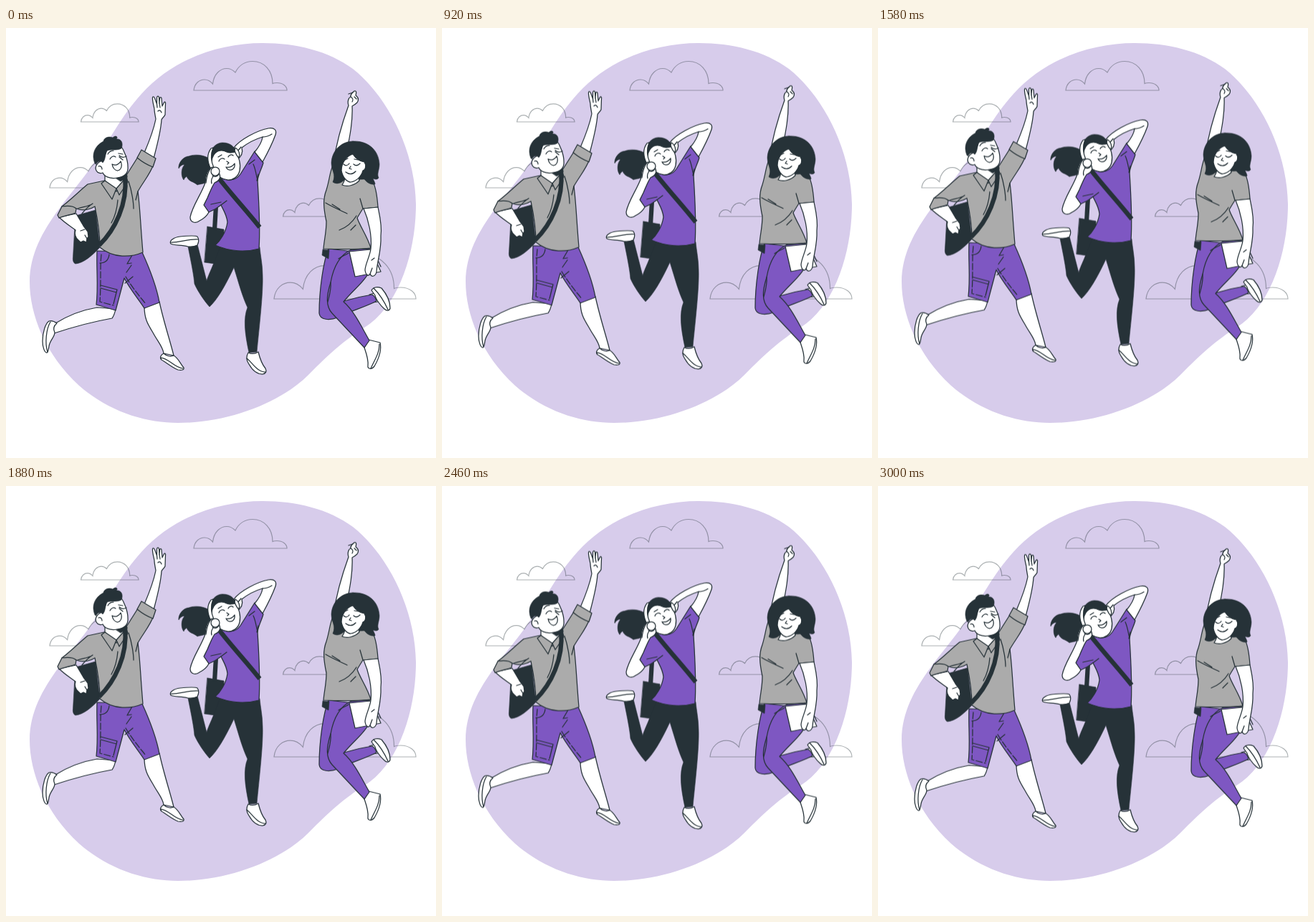
These frames come from a looping animation (600 px wide and 600 px high, 3040 ms). An HTML page:

```html
<!DOCTYPE html>
<html lang="en">
<head>
<meta charset="utf-8">
<title>Jumping friends</title>
<style>
html, body { margin: 0; width: 100%; height: 100%; overflow: hidden; background: #fff; }
svg { display: block; width: 100%; height: 100%; }
#people path, #people circle { stroke: #263238; stroke-width: 1.25; stroke-linejoin: round; stroke-linecap: round; }
#people .w { fill: #fff; }
#people .d { fill: #263238; stroke-width: .6; }
#people .p { fill: #7e57c2; }
#people .g { fill: #ababab; }
#people .l { fill: none; }
#people .strap { fill: none; stroke-width: 6.2; stroke-linecap: butt; }
#people .stitch { fill: none; stroke-dasharray: 9 3; }
#clouds { fill: none; stroke: #263238; stroke-opacity: .38; stroke-width: 1.2; }
#cloud { vector-effect: non-scaling-stroke; }
</style>
</head>
<body>
<svg viewBox="0 0 600 600">
  <defs>
    <path id="cloud" d="M0 0C1-10 8-15 15-15C20-15 24-12 26.500-9C28-23 37-30.500 46-30.500C51-30.500 55-28 58-25C63-35 72-40.500 82-40.500C98-40.500 110-28 110-9.500C112-10.500 114-10.500 116-10.500C124-10.500 130-6 130 0Z"/>
  </defs>
  <path fill="#d7cceb" d="M358 21C298 21 233 43 189 92C160 124 147 153 120 192C88 239 33 288 33 354C33 400 55 456 102 499C143 535 194 551 240 551C310 551 383 523 422 484C451 455 470 437 503 416C550 385 572 310 572 246C571 170 532 95 484 57C450 32 405 21 358 21Z"/>
  <g id="clouds"></g>

  <g id="people">
    <g id="man">
      <path class="w" d="M193 174C199 160 206 142 209 127C208 121 207 117 207 113C206 107 204 102 204.500 97C205 95 207 96 207.500 98L210.500 106L210.500 97C211 94.500 213 94.500 213.500 97L214 105L214.500 98C215 96 216.500 96 217 98L218 109L220.500 104C222 102 223 104 222.500 106L222 121C221 124 218 125 217 128C216 145 211 163 206 182Z"/>
      <path class="l" d="M210.500 106L211 111M214 105L215 111M212 116C214 114 216 115 217 118"/>
      <path class="d" d="M97 262L125 254L131 306C120 318 108 328 97 329C94 328 93 324 93.500 320Z"/>
      <path class="w" d="M74 264C82 272 92 278 97 282C95 287 97 293 101 296L104 299L108 297L112 299L113 294L115 291L114 284L108 276L98 259Z"/>
      <path class="l" d="M104 283L110 281M110 289L113 294"/>

      <path class="w" d="M127 390C103 394 82 404 69 412C65 416 65 422 67 426C85 420 120 410 148 405C151 401 152 397 153 392Z"/>
      <path class="w" d="M60 409C55 412 51 425 51 437C51 446 54 453 57 453C59 453 59 449 60 444C61 436 68 431 68 425C66 421 66 416 71 412C67 409 63 408 60 409Z"/>
      <path class="l" d="M62 410C56 420 54 440 58 452"/>
      <path class="w" d="M193 388C193 405 197 412 205 425C212 438 219 445 220 454L234 457C230 440 220 410 214 382Z"/>
      <path class="w" d="M220 454C216 456 214 460 217 463C224 467 232 474 240 477C245 478 249 477 248 474C243 468 240 460 234 457C230 459 224 458 220 454Z"/>
      <path class="l" d="M216 460C226 460 235 474 247 475"/>

      <path class="p" d="M127 311L190 313C200 335 210 360 214 383L193 391C186 380 172 363 165 349L153 394L126 386C129 360 126 340 127 311Z"/>
      <path class="l" d="M144 316C143 324 138 328 131 328M176 317L169 329L175 328M175 331L168 341M177 347L166 356M132 359L155 365L154 369L132 363M154 369L150 385"/>
      <path class="stitch" d="M133 316C131 335 133 350 131 382L150 387M167 347C178 365 188 376 195 385"/>

      <path class="g" d="M137 213L114 218C104 226 90 240 78 249L98 252C108 256 118 253 124 249C128 268 131 285 131 306C150 322 175 320 191 313C188 280 187 250 184 228C192 214 201 204 206 190L184 180L167 207L154 226Z"/>
      <path class="g" d="M78 249C85 248 94 248 98 252L97 258C92 260 82 262 74 265L72 261Z"/>
      <path class="g" d="M189 170L209 182L205 194C197 191 189 186 183 181Z"/>
      <path class="w" d="M138 202L138 213L154 228L169 207L166 198Z"/>
      <path class="d" d="M148 206C156 207 163 205 168 203L169 209L160 214Z"/>
      <path class="g" d="M138 213L133 217L148 239L154 224ZM154 224L168 208L170 215L158 233Z"/>
      <path class="strap" d="M166 207C170 245 152 282 130 303"/>
      <path class="l" d="M171 214C176 228 178 245 178 252M184 228L181 240M100 252C107 249 114 250 121 245M121 245C116 248 110 254 106 259M156 240C155 252 151 265 147 272"/>

      <path class="w" d="M136 184C128 187 123 193 126 199C128 203 133 203 135 202C137 207 145 211 155 209C166 208 171 202 170 193C170 184 165 171 160 164L143 164Z"/>
      <path class="d" d="M124 189C119 177 123 165 136 158C137 152 145 151 149 153C153 149 157 152 154 155C161 154 164 161 161 168C154 172 145 168 140 172C138 179 139 183 135 188C132 184 127 186 126 190Z"/>
      <path class="l" d="M129 193C132 192 134 194 134 197M142 176C144 172 147 171 150 171M145 183C147 179 150 178 153 180M158 178C161 181 164 181 168 179M157 175L163 176M158 180L163 184"/>
      <path class="w" d="M148 190C153 193 158 190 160 186C163 193 160 199 155 199C151 198 149 195 148 190Z"/>
    </g>

    <g id="dancer">
      <path class="d" d="M287 184C276 176 262 176 255 179C248 179 240 188 241 196C243 192 247 190 249 191C244 196 244 207 248 212C249 209 251 208 252 207C255 215 262 214 267 219C272 217 279 218 283 212Z"/>
      <path class="d" d="M281 277L304 281L306 331L277 327Z"/>
      <path class="strap" d="M293 248L291 282"/>
      <path class="d" d="M299 305C290 330 282 345 280 353L267 302L254 305C259 330 262 345 263 357C268 368 276 380 284 389C294 380 306 360 318 334C326 360 330 375 337 390C331 405 333 425 339 453L350 452C353 420 359 370 358 345C358 330 355 318 354 306Z"/>
      <path class="w" d="M267 303C261 306 256 305 254 305C245 302 235 304 230 301C227 297 234 292 243 291C253 290 263 289 267 291C269 294 269 299 267 303Z"/>
      <path class="l" d="M230 299C240 300 255 294 268 295"/>
      <path class="w" d="M338 453C334 460 336 465 339 469C344 478 351 483 358 483C363 482 364 479 362 475C356 468 354 460 352 452C347 455 342 455 338 453Z"/>
      <path class="l" d="M336 461C343 466 350 480 362 480"/>

      <path class="p" d="M299 208C308 214 320 214 327 204L347 172L359 188C357 196 352 204 351 213C353 245 355 280 353 308C335 313 312 312 292 303C299 297 307 285 309 271C308 260 302 252 300 247C294 252 288 255 283 257L276 247C282 235 288 220 293 210Z"/>
      <path class="l" d="M300 247L308 241M286 246L300 243M351 213C349 204 348 196 345 190M339 190L347 184M350 213L352 204"/>
      <path class="strap" d="M295 207C315 233 335 254 354 278"/>

      <path class="w" d="M318 167C326 156 350 143 366 140C375 138.500 378 143 376 149C371 163 364 176 358 187L347 173C352 167 357 160 358 152C348 155 338 160 329 167C331 174 328 180 322 184Z"/>
      <path class="l" d="M358 152C363 152 368 150 371 148M328 166L323 172"/>
      <path class="d" d="M284 198C278 174 291 160 302 160C314 160 321 167 321 176Z"/>
      <path class="w" d="M290 177C294 171 301 169 308 173C312 175 316 174 320 173C325 179 328 190 326 199C324 208 317 212 310 212C301 211 294 207 290 199C286 190 286 183 290 177Z"/>
      <path class="w" d="M286 168C280 176 281 187 286 197L290 195C286 186 285 177 289 167Z"/>
      <path class="w" d="M320 167C325 170 327 176 325 181C322 179 320 174 319 171Z"/>
      <path class="l" d="M297 186C298 182 302 181 305 183M310 180C311 177 315 176 317 178M296 180L301 177M308 186L311 188L309 190"/>
      <path class="w" d="M307 194C312 195 316 193 319 189C320 195 316 199 312 198C309 198 308 196 307 194Z"/>

      <path class="w" d="M278 216C272 233 260 248 257 264C257 272 265 273 270 269C276 266 281 261 283 257L276 247L281 237C284 230 287 222 291 216C297 214 300 209 298 204C297 199 294 194 288 194C282 196 278 206 278 216Z"/>
      <circle class="w" cx="292" cy="200" r="6"/>
      <path class="l" d="M286 195C280 203 280 210 279 216M289 207C287 210 286 214 287 217M297 204C294 208 291 208 288 206"/>
    </g>

    <g id="reader">
      <path class="w" d="M457 188C461 160 470 130 478 108C476 103 478 97 481 96C480 92 484 90 486 88C489 87 489 90 488 94C492 97 492 101 490 104C488 106 485 108 483 109C484 130 480 150 475 175Z"/>
      <path class="l" d="M478 92L484 90M481 96C484 98 485 100 483 103M486 96L489 99"/>

      <path class="w" d="M507 372L517 369L519 382L511 383Z"/>
      <path class="w" d="M510 366C513 361 519 361 524 363C530 370 536 380 536 391C535 395 531 395 528 392C522 387 516 378 515 373Z"/>
      <path class="l" d="M513 363C520 370 528 382 533 393"/>
      <path class="p" d="M450 308C443 325 437 365 437 398C438 408 452 408 463 404C482 394 500 390 517 381C516 377 514 374 511 372C498 374 485 377 472 381L485 312Z"/>
      <path class="w" d="M506 435L522 439C524 448 521 460 514 472C510 477 504 476 505 471C506 462 502 452 500 446Z"/>
      <path class="l" d="M521 441C521 455 514 463 509 475"/>
      <path class="p" d="M482 309C463 318 456 338 453 355C447 374 446 388 455 398L500 446L507 436C496 417 486 395 471 382C483 367 500 354 505 343C509 330 510 320 507 308Z"/>
      <path class="l" d="M453 355C454 365 451 374 449 382M464 322C469 318 474 317 478 314"/>
      <path class="d" d="M442 309L441 317L450 322L451 310Z"/>

      <path class="g" d="M457 190C452 198 452 210 447 226C442 239 443 251 447 270C447 285 444 295 443 308C465 309 490 309 509 307C504 290 494 277 490 265C493 260 496 255 498 252L519 250C518 236 516 222 512 215C503 209 496 207 490 207L470 212Z"/>
      <path class="l" d="M446 244C456 250 466 254 476 259M455 246L466 253M489 262C484 270 476 278 465 282M488 275L481 282M498 252L494 238"/>
      <path class="w" d="M479 312L509 309L523 340L487 347Z"/>
      <path class="l" d="M481 310L511 307L523 333"/>
      <path class="w" d="M499 252C506 268 511 290 509 308C508 318 501 330 501 338C502 345 506 347 508 343C510 349 516 346 517 340C518 325 524 310 523 290C525 275 521 260 519 250Z"/>
      <path class="l" d="M508 343L511 335M510 324L514 321"/>

      <path class="d" d="M484 158C469 158 455 170 454 188C454 199 461 204 456 215C462 219 468 216 472 212L500 211C504 216 509 219 515 218C515 215 513 213 512 210C516 212 519 211 520 209C517 204 521 198 521 190C520 170 505 157 484 158Z"/>
      <path class="w" d="M472 207C474 212 471 216 469 219C476 222 486 220 493 213L490 202Z"/>
      <path class="w" d="M484 176C474 179 468 189 468 199C470 209 476 215 481 215C489 214 496 207 498 199C502 198 503 191 500 187C493 186 488 182 484 176Z"/>
      <path class="l" d="M471 190C474 193 477 192 479 189M485 190C488 193 491 192 494 189M473 184L477 182M486 183L491 184M481 193L479 196L482 197M474 201C479 205 484 204 488 200"/>
    </g>
  </g>
</svg>
<script>
const LOOP = 3040, LIFT = 12;

// x, baseline, scale
const clouds = [
  [262, 87, 1], [104.5, 131, .62], [61, 223, .93], [386.5, 263, .62], [374, 378, 1.523]
];
const sky = document.getElementById('clouds');
for (const [x, y, s] of clouds) {
  const use = document.createElementNS('http://www.w3.org/2000/svg', 'use');
  use.setAttribute('href', '#cloud');
  use.setAttribute('transform', `translate(${x} ${y}) scale(${s})`);
  sky.append(use);
}

const bob = [0, -LIFT, 0].map(y => ({ transform: `translateY(${y}px)` }));
document.getElementById('people').animate(bob, { duration: LOOP, iterations: Infinity, easing: 'linear' });
</script>
</body>
</html>
```
